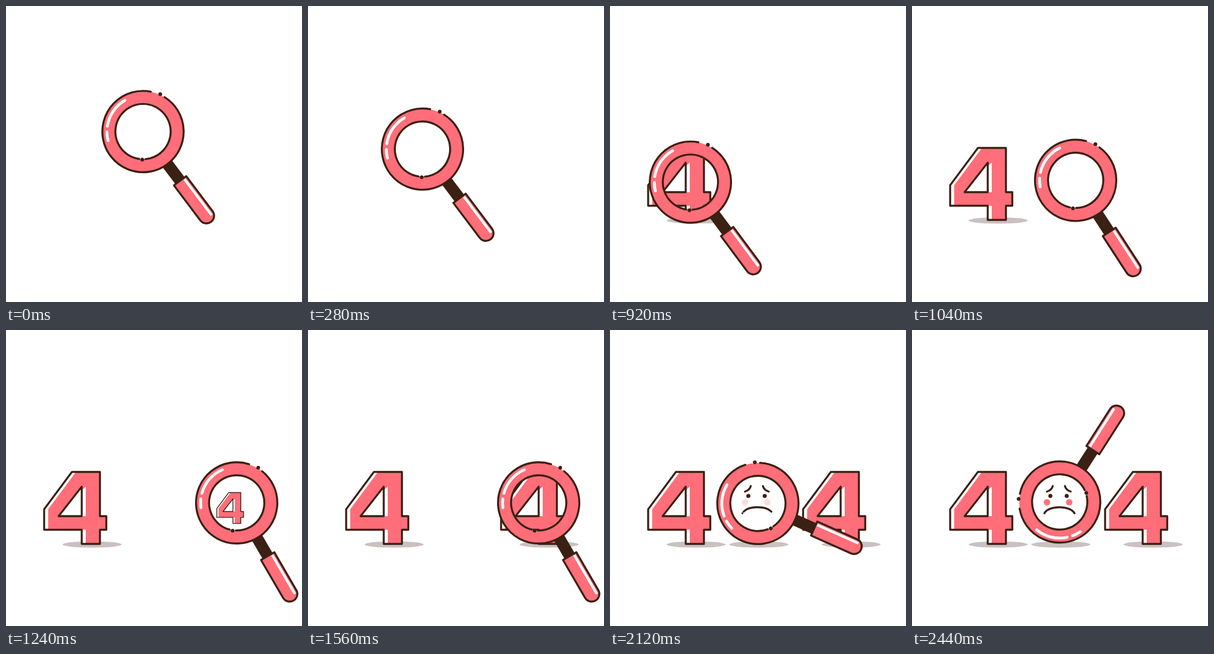
Write an HTML page that moves like this. It is 512 px wide and 512 px high and loops after 2880 ms.

```html
<!DOCTYPE html>
<html lang="en">
<head>
<meta charset="utf-8">
<title>404</title>
<style>
  html, body { margin: 0; width: 100%; height: 100%; overflow: hidden; background: #fff; }
  svg { display: block; width: 100vw; height: 100vh; }
  .line { fill: none; stroke: #3b2014; stroke-width: 3.4; stroke-linecap: round; stroke-linejoin: round; }
  .dark { fill: #3b2014; }
  .pink { fill: #ff6e79; }
  .shine { fill: none; stroke: #fff; stroke-width: 4.8; stroke-linecap: round; }
  .shadow { fill: #c9c1c1; }
</style>
</head>
<body>
<svg viewBox="0 0 512 512">
  <defs>
    <path id="four" fill-rule="evenodd" clip-rule="evenodd"
      d="M114 245.5H162.5V322H173.5V345.5H162.5V370H131V345.5H66V310ZM131 271V322H91Z"/>
    <clipPath id="inside"><use href="#four" clip-rule="evenodd"/></clipPath>
    <path id="grip" d="M106.5 -13.3H182.2A13.3 13.3 0 0 1 182.2 13.3H106.5Z"/>
    <g id="digit">
      <use href="#four" fill="#fff"/>
      <g clip-path="url(#inside)">
        <use href="#four" class="pink" x="7"/>
        <path d="M131 277L138 271V322H131Z" fill="#fff"/>
      </g>
      <use href="#four" class="line"/>
    </g>
  </defs>

  <ellipse class="shadow" id="shadowA" cx="149" cy="371" rx="51" ry="5.5"/>
  <ellipse class="shadow" id="shadowB" cx="417" cy="371" rx="51" ry="5.5"/>
  <ellipse class="shadow" id="shadowO" cx="257.5" cy="371" rx="51" ry="5.5"/>
  <use id="digitA" href="#digit"/>
  <use id="digitB" href="#digit"/>

  <g id="face">
    <g id="eyes">
      <path class="line" d="M233.5 279.5Q241.5 277 243.5 270M264.5 270Q266.5 277 274.5 279.5"/>
      <circle class="dark" cx="239.3" cy="287" r="3.5"/>
      <circle class="dark" cx="267.6" cy="287" r="3.5"/>
    </g>
    <g id="cheeks" fill="#ff737d">
      <circle cx="233.5" cy="298" r="5.6"/>
      <circle cx="272" cy="298" r="5.6"/>
    </g>
    <path id="mouth" class="line" d="M229 317C236 303 274 303 281 317"/>
  </g>

  <g id="glass">
    <g transform="rotate(53)">
      <rect class="dark" x="66" y="-10" width="44" height="20"/>
      <use href="#grip" class="pink"/>
      <path class="shine" d="M109 -7.8H187" style="stroke-width:4.4;stroke-linecap:butt"/>
      <use href="#grip" class="line"/>
    </g>
    <path class="pink" fill-rule="evenodd"
      d="M-70 0A70 70 0 1 1 70 0A70 70 0 1 1 -70 0ZM-47.8 0A47.8 47.8 0 1 1 47.8 0A47.8 47.8 0 1 1 -47.8 0Z"/>
    <path class="line" id="rimOut"/>
    <path class="line" id="rimIn"/>
    <path class="shine" id="shineLong"/>
    <path class="shine" id="shineShort"/>
    <circle class="dark" cx="29.8" cy="-64.8" r="3.2"/>
    <circle class="dark" cx="-1.3" cy="48.6" r="3.2"/>
  </g>
</svg>
<script>
const LOOP = 2880, STEP = 40;
const $ = id => document.getElementById(id);

function arc(r, from, to) {
  const at = deg => {
    const a = deg * Math.PI / 180;
    return `${(r * Math.cos(a)).toFixed(2)} ${(r * Math.sin(a)).toFixed(2)}`;
  };
  return `M${at(from)}A${r} ${r} 0 ${to - from > 180 ? 1 : 0} 1 ${at(to)}`;
}
$('rimOut').setAttribute('d', arc(70.3, -58, 281));
$('rimIn').setAttribute('d', arc(47.8, 98, 445));
$('shineLong').setAttribute('d', arc(62.4, 188.5, 240));
$('shineShort').setAttribute('d', arc(62.4, 165.5, 179.5));

function ramp(t, from, to) {
  const u = Math.min(1, Math.max(0, (t - from) / (to - from)));
  return (1 - Math.cos(Math.PI * u)) / 2;
}

// Eased value through [time, value] keys
function track(t, keys) {
  let value = keys[0][1];
  for (let i = 1; i < keys.length; i++) {
    value += (keys[i][1] - keys[i - 1][1]) * ramp(t, keys[i - 1][0], keys[i][0]);
  }
  return value;
}

const glassX = [[180, 237], [430, 124.1], [875, 124.1], [1175, 399], [1593, 399], [1890, 256], [2440, 255.5]];
const glassY = [[180, 217.2], [430, 305], [875, 305], [1175, 299], [1593, 299], [1760, 298], [1890, 298], [2120, 300], [2400, 297.5]];
const glassTurn = [[875, 0], [1175, 6.8], [1930, 6.8], [2440, -110.4]];

function grow(id, x, y, scale, dx = 0) {
  $(id).setAttribute('transform', `translate(${x + dx} ${y}) scale(${scale}) translate(${-x} ${-y})`);
  $(id).style.display = scale > 0 ? '' : 'none';
}

function draw(t) {
  grow('digitA', 119.7, 308, ramp(t, 365, 765));
  grow('digitB', 119.7, 308, ramp(t, 1058, 1458), 268);
  $('shadowA').style.opacity = ramp(t, 640, 860);
  $('shadowB').style.opacity = ramp(t, 1333, 1553);
  $('shadowO').style.opacity = ramp(t, 1860, 2080);

  grow('eyes', 253.5, 280, ramp(t, 1880, 2080));
  $('cheeks').style.opacity = ramp(t, 2040, 2280);

  // The mouth is drawn outwards from its middle
  const mouth = $('mouth'), length = mouth.getTotalLength();
  const shown = length * ramp(t, 1920, 2180);
  const gap = (length - shown) / 2;
  mouth.style.strokeDasharray = `0 ${gap} ${shown} ${length}`;
  mouth.style.display = shown > 0 ? '' : 'none';

  $('glass').setAttribute('transform',
    `translate(${track(t, glassX)} ${track(t, glassY)}) rotate(${track(t, glassTurn)})`);
}

const start = performance.now();
function tick() {
  const t = (performance.now() - start) % LOOP;
  draw(Math.floor(t / STEP) * STEP);
  requestAnimationFrame(tick);
}
tick();
</script>
</body>
</html>
```
